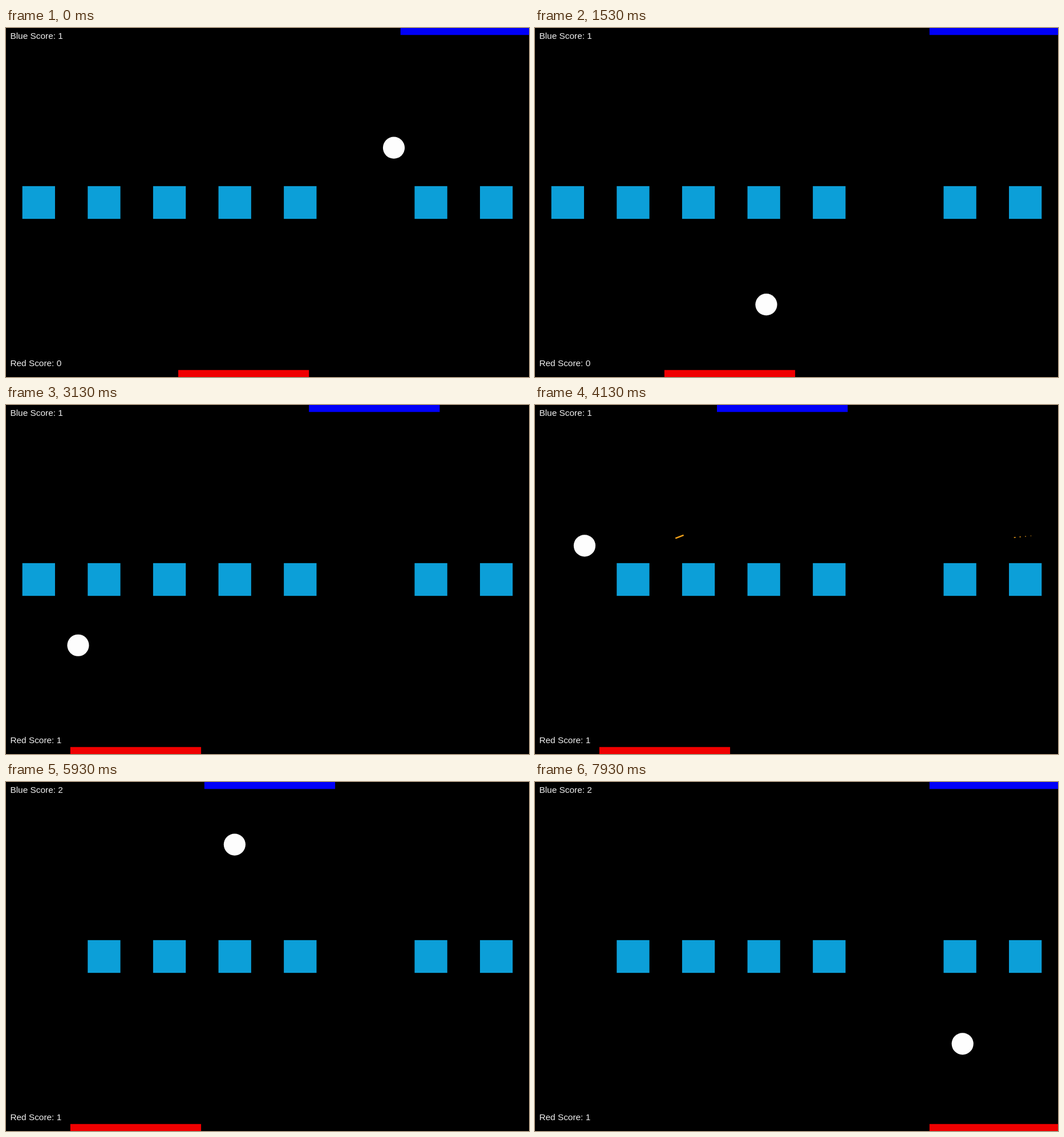
Recreate the animation shown at these times as an HTML page with a canvas. Size 917 by 611 pixels, loop 8 s.

```html
<!DOCTYPE html>
<html lang="en">
<head>
<meta charset="utf-8">
<title>Two-paddle game</title>
<style>
  html, body { margin: 0; width: 100%; height: 100%; overflow: hidden; background: #000; }
  canvas { display: block; }
</style>
</head>
<body>
<canvas id="stage" width="917" height="611"></canvas>
<script>
const ctx = document.getElementById('stage').getContext('2d');
const W = 917, H = 611, LOOP = 8000, TICK = 200, FIRST = 130;
const RADIUS = 19.1, BALL_SPEED = 34.88, PADDLE_SPEED = 68.6;
const BLOCK = W / 16, PADDLE_W = W / 4, PADDLE_H = H / 50;
const PADDLE_MAX = 691.7;

// Ticks at which something is hit.
const FLOOR_HIT = 11.09, BLOCK_HIT = 18.1, CEILING_HIT = 27.45;

// Reflects an unbounded coordinate between two walls.
function bounce(v, lo, hi) {
  const span = hi - lo;
  const d = (((v - lo) % (2 * span)) + 2 * span) % (2 * span);
  return lo + (d < span ? d : 2 * span - d);
}

function ball(n) {
  const path = BALL_SPEED * Math.max(0, n - 0.13);
  return {
    x: bounce(680 - path, 19.5, W - 19.5),
    y: bounce(209.7 + path, 21, H - 19)
  };
}

// Each key press [tick, goal] slides a paddle to its goal at constant speed.
function slide(n, x, presses) {
  for (const [tick, goal] of presses) {
    const reach = PADDLE_SPEED * Math.max(0, n - tick);
    x += Math.sign(goal - x) * Math.min(reach, Math.abs(goal - x));
  }
  return x;
}

const redX = n => slide(n, 302, [[5.16, 244], [7.75, 112.8], [30.83, PADDLE_MAX]]);
const blueX = n => slide(n, PADDLE_MAX, [[13.66, 319], [24.5, 347.8], [32.08, PADDLE_MAX]]);

function random(seed) {
  return () => (seed = (seed * 16807) % 2147483647) / 2147483647;
}

// Sparks spread over an angle range with seeded reach and life.
function burst(pos, start, seed, count, from, to, reach) {
  const rnd = random(seed);
  const sparks = Array.from({ length: count }, (_, i) => ({
    deg: from + (to - from) * (i + rnd()) / count,
    far: reach * (0.25 + 0.75 * rnd()),
    life: 0.22 + 0.28 * rnd()
  }));
  return { ...pos, start, sparks };
}

const blockBurst = burst({ x: BLOCK, y: H / 2 }, BLOCK_HIT, 9311, 18, 0, 360, 800);
// One slow spark outlives the rest, one fast spark crosses the stage.
blockBurst.sparks.push(
  { deg: -20.9, far: 254.6, life: 1.1 },
  { deg: -5.37, far: 972, life: 0.62 }
);

const bursts = [
  burst(ball(FLOOR_HIT), FLOOR_HIT, 4127, 10, -110, -15, 1000),
  blockBurst,
  burst(ball(CEILING_HIT), CEILING_HIT, 5783, 12, 12, 168, 560)
];

function drawSpark(b, s, n) {
  const age = (n - b.start) * TICK / 1000;
  if (age < 0 || age >= s.life) return;
  const dist = s.far * (1 - Math.exp(-3 * age));
  const len = 9 + s.far * 0.025;
  const width = 5.5 * (1 - age / s.life);
  ctx.save();
  ctx.translate(b.x, b.y);
  ctx.rotate(s.deg * Math.PI / 180);
  ctx.fillStyle = '#f5a31a';
  if (width < 0.6) {
    // Nearly spent sparks break up into dots.
    for (let i = 0; i < 4; i++) {
      ctx.globalAlpha = 1 - i * 0.14;
      ctx.fillRect(dist - 15.5 + i * 9.7, -0.75, 3 - i * 0.5, 1.5);
    }
  } else {
    ctx.fillRect(dist - len / 2, -width / 2, len, width);
  }
  ctx.restore();
}

function rect(color, x, y, w, h) {
  ctx.fillStyle = color;
  ctx.fillRect(x, y, w, h);
}

function draw(n) {
  rect('#000', 0, 0, W, H);
  for (let i = 0; i < 8; i++) {
    const gone = i === 5 || (i === 0 && n > BLOCK_HIT);
    if (!gone) rect('#0c9fd8', BLOCK * (2 * i + 0.5), (H - BLOCK) / 2, BLOCK, BLOCK);
  }
  for (const b of bursts) for (const s of b.sparks) drawSpark(b, s, n);

  rect('#0000f8', blueX(n), 0, PADDLE_W, PADDLE_H);
  rect('#f00000', redX(n), H - PADDLE_H, PADDLE_W, PADDLE_H);

  const { x, y } = ball(n);
  ctx.fillStyle = '#fdfdfd';
  ctx.beginPath();
  ctx.arc(x, y, RADIUS, 0, Math.PI * 2);
  ctx.fill();

  ctx.fillStyle = '#f0f0f0';
  ctx.font = '15.4px "Liberation Sans", Arial, sans-serif';
  ctx.fillText('Blue Score: ' + (n > CEILING_HIT ? 2 : 1), 7.4, 19);
  ctx.fillText('Red Score: ' + (n > FLOOR_HIT ? 1 : 0), 7.4, 592);
}

function frame() {
  const t = performance.now() % LOOP;
  draw(t < FIRST ? 0 : Math.floor((t - FIRST) / TICK) + 1);
  requestAnimationFrame(frame);
}
frame();
</script>
</body>
</html>
```
